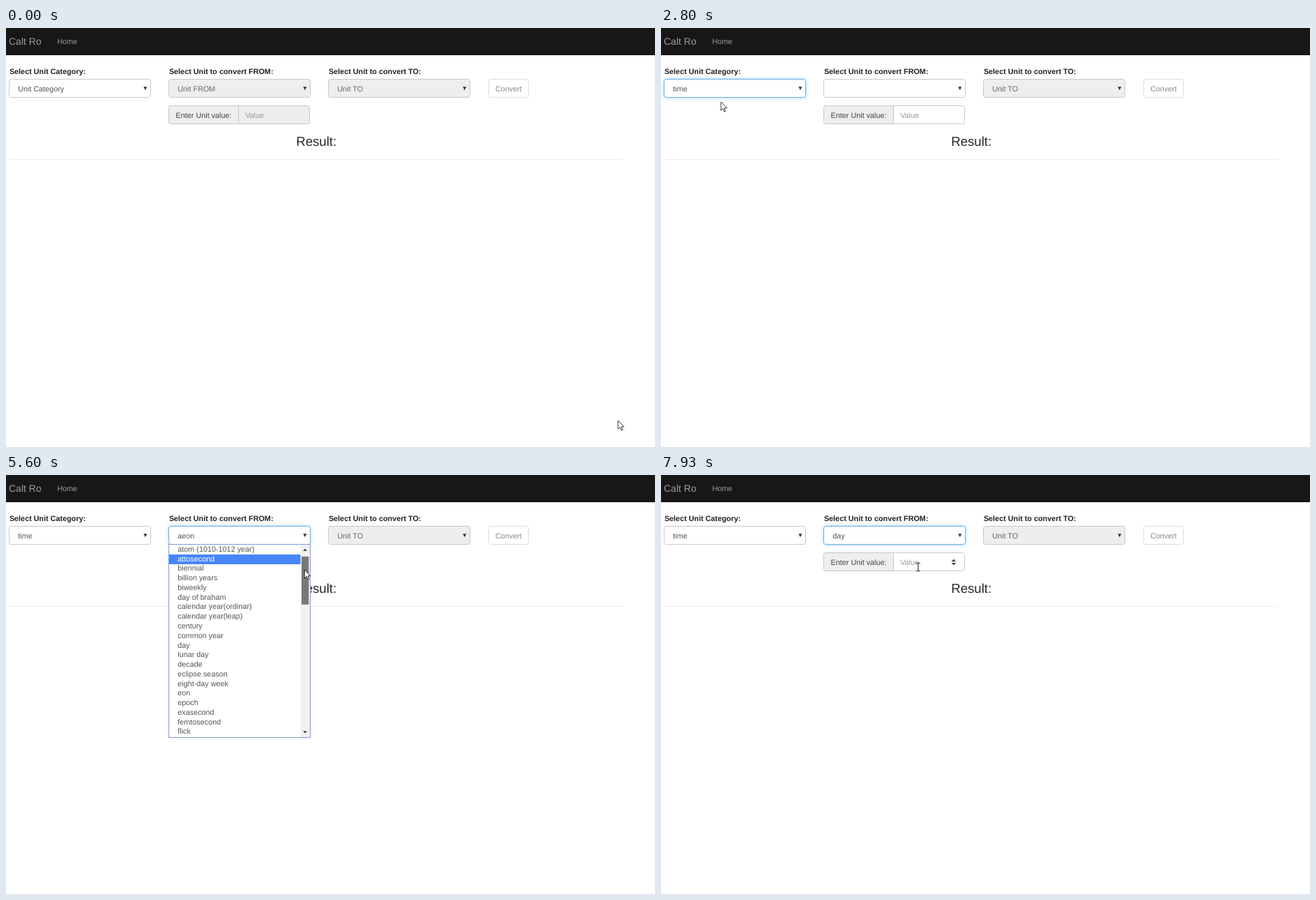
An HTML page for the animation above (8 s loop, 931 px wide and 601 px high).

```html
<!DOCTYPE html>
<html lang="en">
<head>
<meta charset="utf-8">
<title>Unit conversion form</title>
<style>
html, body { margin: 0; width: 100%; height: 100%; overflow: hidden; background: #fff; }
svg { display: block; width: 931px; height: 601px; }
text {
  font: 10.82px "Liberation Sans", Arial, sans-serif;
  text-rendering: geometricPrecision;
  fill: #555;
  white-space: pre;
}
.label { font-weight: bold; fill: #222; }
.box { fill: #fff; stroke: #c8c8c8; stroke-width: 1; }
.off { fill: #eee; }
.focus { stroke: #66afe9; filter: drop-shadow(0 0 2.5px rgba(102, 175, 233, .6)); }
.popup { fill: #fff; stroke: #7f9bdc; stroke-width: 1; }
.mark { fill: #4787fb; }
.picked { fill: #fff; }
</style>
</head>
<body>
<svg id="stage" viewBox="0 0 931 601"></svg>
<script>
const LOOP = 8000, TICK = 1000 / 15;
const ROW = 13.77, TOP = 100.5, BAR = 423, RATIO = 3.97;
const stage = document.getElementById('stage');

const CATEGORIES = ['time', 'length', 'mass', 'electric current',
  'thermodynamic temperature', 'luminous intensity', 'currencies'];
const UNITS = ['aeon', 'atom (1010-1012 year)', 'attosecond', 'biennial',
  'billion years', 'biweekly', 'day of braham', 'calendar year(ordinar)',
  'calendar year(leap)', 'century', 'common year', 'day', 'lunar day', 'decade',
  'eclipse season', 'eight-day week', 'eon', 'epoch', 'exasecond', 'femtosecond',
  'flick', 'fortnight', 'friedman unit', 'galactic year', 'gaussian year'];

// time, x, y, and 1 when the move towards this point is eased
const POINTER = [
  [0, 878, 563], [870, 106, 85, 1], [930, 105, 84],
  [1600, 105, 84], [1730, 101, 97], [1870, 96, 110], [2000, 92, 122],
  [2130, 89, 115], [2270, 86, 106],
  [2800, 86, 106], [3530, 395, 90, 1],
  [4070, 395, 90], [4270, 410, 118], [4400, 418, 131], [4530, 431, 131],
  [4930, 431, 131], [5000, 430, 132],
  [5400, 430, 132], [5870, 426, 141], [6070, 425, 150], [6270, 412, 155],
  [6530, 357, 184], [6800, 348, 189],
  [7600, 348, 189], [7930, 369, 132]
];
const SCROLL = [[0, 0], [5400, 0], [5870, 33.2], [6070, 70.2]];

function add(parent, tag, attrs, content) {
  const el = document.createElementNS('http://www.w3.org/2000/svg', tag);
  for (const key in attrs) el.setAttribute(key, attrs[key]);
  if (content !== undefined) el.textContent = content;
  parent.appendChild(el);
  return el;
}
const group = (parent = stage) => add(parent, 'g', {});
const rect = (parent, x, y, width, height, attrs) =>
  add(parent, 'rect', { x, y, width, height, ...attrs });
const text = (parent, x, y, content, attrs) =>
  add(parent, 'text', { x, y, ...attrs }, content);
const path = (parent, d, attrs) => add(parent, 'path', { d, ...attrs });
const show = (el, on) => el.setAttribute('visibility', on ? 'visible' : 'hidden');

function select(x, label, value) {
  text(stage, x + .4, 65.8, label, { class: 'label' });
  const box = rect(stage, x, 73.5, 203, 26, { rx: 3, class: 'box' });
  path(stage, `M${x + 192.8} 84.2h5l-2.5 5z`, { fill: '#333' });
  return { box, value: text(stage, x + 12.8, 90.6, value) };
}

function setSelect(sel, value, off, focus) {
  sel.value.textContent = value;
  sel.value.style.fill = off ? '#666' : '#555';
  sel.box.setAttribute('class', 'box' + (off ? ' off' : '') + (focus ? ' focus' : ''));
}

function dropdown(x, height, options, clip) {
  const root = group();
  rect(root, x, 99.5, 203, height, { class: 'popup' });
  const view = add(root, 'g', { 'clip-path': `url(#${clip})` });
  const def = add(add(root, 'defs', {}), 'clipPath', { id: clip });
  rect(def, x + .5, 100, 202, height - 1);
  const mark = rect(view, x + .5, TOP, 202, 14, { class: 'mark' });
  const list = group(view);
  const rows = options.map((name, i) => text(list, x + 12.8, 110.5 + i * ROW, name));
  return { root, list, mark, rows };
}

function setMark(menu, row, scroll) {
  show(menu.mark, row >= 0 && menu.open);
  menu.mark.setAttribute('y', Math.round(TOP + row * ROW - scroll));
  menu.rows.forEach((el, i) => el.setAttribute('class', i === row ? 'picked' : ''));
}

// page
rect(stage, 0, 0, 931, 39, { fill: '#171717' });
rect(stage, 0, 38, 931, 1, { fill: '#0f0f0f' });
text(stage, 4, 24, 'Calt Ro', { style: 'font-size:14px;fill:#9d9d9d' });
text(stage, 73.5, 23.2, 'Home', { style: 'fill:#9d9d9d' });

const category = select(4.5, 'Select Unit Category:', 'Unit Category');
const from = select(233.5, 'Select Unit to convert FROM:', 'Unit FROM');
const to = select(462.5, 'Select Unit to convert TO:', 'Unit TO');
setSelect(to, 'Unit TO', true, false);

rect(stage, 692.5, 73.5, 57, 26, { rx: 3, fill: '#fff', stroke: '#ddd' });
text(stage, 720.9, 90.6, 'Convert', { 'text-anchor': 'middle', style: 'fill:#878787' });

const field = rect(stage, 233.5, 111.5, 202, 26, { rx: 3, class: 'box off' });
path(stage, 'M333.5 111.5H236.5a3 3 0 0 0-3 3v20a3 3 0 0 0 3 3H333.5z',
  { fill: '#eee', stroke: '#c8c8c8' });
text(stage, 243.6, 128.6, 'Enter Unit value:', { style: 'fill:#444' });
text(stage, 343.2, 128.6, 'Value', { style: 'fill:#999' });
const spinner = path(stage, 'M416.6 124.2h6.4l-3.2-3.6zM416.6 126h6.4l-3.2 3.6z', { fill: '#444' });

text(stage, 416.2, 169.2, 'Result:', { style: 'font-size:18.65px;fill:#282828' });
rect(stage, 4, 188, 882, 1, { fill: '#eee' });

// menus
const catMenu = dropdown(4.5, 98, CATEGORIES, 'catClip');
const unitMenu = dropdown(233.5, 277, UNITS, 'unitClip');
rect(unitMenu.root, 422.5, 100, 13.5, 276, { fill: '#f1f1f1' });
const thumb = rect(unitMenu.root, 424, 113.3, 10.3, 68.9);
const upArrow = path(unitMenu.root, 'M426 109h6l-3-3.2z');
path(unitMenu.root, 'M426 367.3h6l-3 3.2z', { fill: '#444' });

// pointers
const arrow = path(stage, 'M0 0V12.4L2.9 9.6 4.9 14.2 6.7 13.4 4.7 8.9H8.6z',
  { fill: '#fff', stroke: '#111', 'stroke-width': .85 });
const beam = path(stage, 'M-2.8-5.7H-.7L0-5 .7-5.7H2.8M0-5V5M-2.8 5.7H-.7L0 5 .7 5.7H2.8',
  { fill: 'none', stroke: '#111', 'stroke-width': 1 });

function track(keys, t) {
  const i = keys.findIndex(k => k[0] > t);
  if (i < 0) return keys[keys.length - 1].slice(1);
  const a = keys[i - 1], b = keys[i];
  let p = (t - a[0]) / (b[0] - a[0]);
  if (b[3]) p = p * p * (3 - 2 * p);
  return a.slice(1, 3).map((v, n) => v + (b[n + 1] - v) * p);
}

function render(ms) {
  // the picture advances 15 times a second
  const t = Math.floor((ms + 4) / TICK) * TICK + 4;
  const [x, y] = track(POINTER, t);
  const [scroll] = track(SCROLL, t);
  const within = (a, b) => t >= a && t < b;
  const rowAt = offset => Math.floor((y - TOP + offset) / ROW);
  const ready = t >= 2800;

  setSelect(category, ready ? 'time' : 'Unit Category', false, within(1400, 3800));
  const unit = !ready ? 'Unit FROM' : t < 2930 ? '' : t < 7070 ? 'aeon' : 'day';
  setSelect(from, unit, !ready, t >= 3800);
  field.setAttribute('class', ready ? 'box' : 'box off');

  catMenu.open = within(1470, 2800);
  show(catMenu.root, catMenu.open);
  setMark(catMenu, y >= TOP ? rowAt(0) : -1, 0);

  unitMenu.open = within(3870, 7070);
  show(unitMenu.root, unitMenu.open);
  const inList = y >= TOP && x < BAR;
  setMark(unitMenu, inList ? rowAt(scroll) : y < TOP ? 0 : 2, scroll);
  unitMenu.list.setAttribute('transform', `translate(0 ${-scroll})`);
  thumb.setAttribute('y', 113.3 + scroll / RATIO);
  thumb.setAttribute('fill',
    within(5470, 6100) ? '#787878' : x >= BAR && y > 113 ? '#a8a8a8' : '#c1c1c1');
  upArrow.setAttribute('fill', scroll > 0 ? '#444' : '#a3a3a3');

  const typing = t > 7600 && y < 137.5;
  show(spinner, typing);
  show(beam, typing);
  show(arrow, !typing);
  (typing ? beam : arrow).setAttribute('transform', `translate(${x} ${y})`);
}

const start = performance.now();
function frame() {
  render((performance.now() - start) % LOOP);
  requestAnimationFrame(frame);
}
frame();
</script>
</body>
</html>
```
